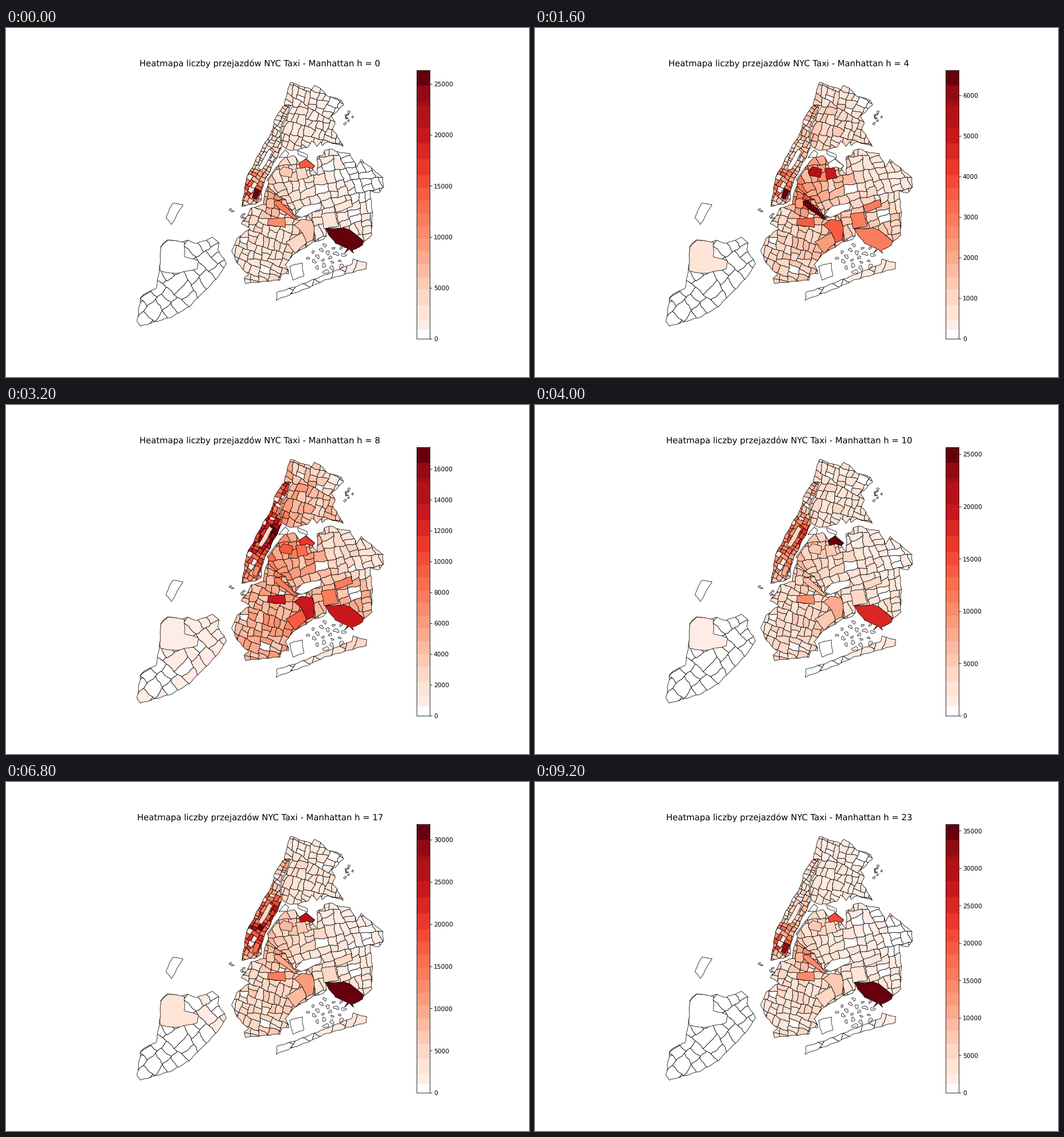
Animation of 917 by 611 pixels, one loop 9.6 s. Source, as a matplotlib script:

```python
import math
import random

import matplotlib.pyplot as plt
import numpy as np
from matplotlib.animation import FuncAnimation
from matplotlib.collections import PolyCollection
from matplotlib.patches import Polygon, Rectangle
from matplotlib.path import Path

W, H, DPI = 917, 611, 64
PT = 72 / DPI          # points per pixel
LINE = 0.75 * PT
plt.rcParams["text.hinting"] = "none"

# Levels are shares of the peak at these hours, linear in between
HOURS = [0, 4, 8, 10, 17, 24]
PEAK_HOURS = [0, 4, 8, 10, 14, 17, 23]
PEAKS = [26370, 6620, 17430, 25690, 28600, 31870, 35900]

QUIET = (.01, .02, .03, .02, .02)
JAMAICA = (.10, .43, .42, .18, .18)

# Land border shared by two boroughs, north-west to south
BORDER = [(459, 277), (475, 292), (489, 301), (509, 333), (529, 327), (537, 337), (541, 374)]

# name: (grid angle, largest zone area, coast key points, anchors with their levels)
BOROUGHS = {
    "manhattan": (29, 105, [
        (413, 312), (418, 287), (421, 264), (433, 241), (447, 214), (468, 178), (470, 162),
        (485, 137), (499, 134), (494, 150), (485, 166), (480, 180), (483, 210), (473, 230),
        (460, 255), (449, 279), (447, 303), (436, 308)], {
        (475, 170): (.13, .25, .52, .23, .22),
        (462, 230): (.13, .18, .95, .60, .66),
        (442, 236): (.09, .16, .72, .44, .46),
        (437, 256): (.33, .42, .60, .42, .68),
        (426, 284): (.52, .44, .40, .33, .50),
        (422, 308): (.15, .14, .32, .22, .26)}),
    "bronx": (20, 270, [
        (498, 95), (536, 108), (540, 100), (551, 106), (563, 118), (589, 127), (592, 134),
        (571, 154), (577, 166), (573, 178), (583, 193), (591, 207), (565, 199), (555, 205),
        (551, 198), (546, 208), (536, 198), (528, 209), (499, 215), (484, 206), (482, 181),
        (487, 167), (503, 136), (488, 135), (491, 121)], {
        (492, 185): (.09, .20, .36, .15, .14),
        (530, 160): (.07, .16, .26, .11, .10),
        (560, 185): (.05, .13, .22, .09, .08),
        (588, 137): QUIET}),
    "queens": (-15, 360, BORDER + [
        (556, 371), (562, 364), (560, 351), (582, 350), (603, 353), (627, 374), (641, 363),
        (642, 320), (638, 285), (655, 289), (661, 279), (661, 262), (622, 230), (616, 244),
        (602, 219), (588, 219), (571, 212), (558, 214), (556, 222), (546, 226), (546, 256),
        (537, 247), (541, 241), (526, 229), (514, 237), (506, 224), (490, 226), (479, 238),
        (460, 266)], {
        (482, 262): (.16, .38, .40, .20, .22),
        (530, 285): (.08, .21, .28, .13, .12),
        (600, 335): (.06, .17, .25, .10, .08),
        (590, 250): (.03, .09, .11, .06, .05),
        (640, 270): (.01, .06, .08, .03, .03)}),
    "brooklyn": (15, 260, BORDER + [
        (522, 386), (506, 394), (490, 414), (497, 430), (483, 431), (481, 441), (420, 447),
        (418, 437), (425, 433), (405, 410), (396, 390), (405, 369), (428, 351), (413, 343),
        (431, 315), (452, 309), (452, 295)], {
        (466, 300): (.33, .48, .36, .22, .28),
        (434, 327): (.10, .12, .25, .12, .14),
        (488, 362): (.13, .22, .34, .17, .18),
        (445, 405): (.09, .15, .27, .13, .14)}),
    "staten": (-40, 850, [
        (271, 383), (284, 370), (305, 375), (318, 372), (335, 377), (362, 367), (374, 376),
        (371, 388), (387, 412), (370, 438), (322, 487), (290, 506), (235, 522), (230, 513),
        (236, 472), (250, 461), (263, 457), (272, 405)], {
        (345, 410): (.01, .025, .055, .028, .032),
        (260, 480): QUIET}),
    "rockaway": (20, 900, [
        (475, 463), (474, 476), (530, 455), (560, 441), (632, 421), (632, 411), (609, 405),
        (607, 413), (540, 440), (510, 452)], {
        (520, 452): QUIET,
        (615, 414): (.05, .08, .15, .07, .08)}),
}

# Zones that stand out: levels, outline
LANDMARKS = [
    (QUIET, [(508, 327), (520, 312), (553, 306), (552, 316), (518, 332)]),
    ((.03, .03, .18, .15, .15), [(442, 246), (449, 249), (468, 216), (461, 212)]),
    ((.98, 1, .40, .30, .50), [(432, 297), (437, 281), (446, 285), (439, 300)]),
    ((.32, .42, .70, .50, .97), [(441, 256), (444, 250), (451, 254), (447, 261)]),
    ((.42, .97, .45, .25, .30), [(470, 303), (479, 302), (509, 331), (507, 336), (470, 309)]),
    ((.40, .56, .75, .38, .42), [(460, 334), (489, 332), (490, 349), (459, 345)]),
    ((.19, .56, .75, .30, .37), [(506, 345), (517, 335), (537, 337), (541, 352), (538, 372),
                                 (527, 376), (520, 358)]),
    ((.14, .36, .55, .22, .24), [(491, 375), (520, 358), (527, 376), (507, 394)]),
    ((.20, .80, .55, .23, .27), [(479, 250), (486, 243), (503, 247), (500, 262), (482, 258)]),
    ((.13, .78, .50, .20, .22), [(508, 247), (524, 243), (530, 262), (512, 266)]),
    (JAMAICA, [(553, 326), (576, 322), (583, 347), (558, 351)]),
    (JAMAICA, [(575, 311), (605, 300), (608, 312), (580, 323)]),
    ((.01, .09, .06, .05, .08), [(271, 384), (284, 371), (313, 375), (313, 400), (338, 408),
                                 (335, 422), (296, 430), (270, 426)]),
    ((.52, .03, .63, 1, .82), [(514, 237), (525, 229), (541, 241), (536, 247), (527, 243),
                               (516, 246)]),
    ((1, .42, .74, .68, 1), [(560, 351), (575, 352), (592, 350), (603, 353), (627, 374),
                             (625, 381), (608, 389), (609, 395), (602, 387), (594, 394),
                             (599, 386), (578, 377), (566, 362)]),
]
ISLANDS = [
    [(293, 307), (310, 309), (303, 322), (290, 344), (281, 333), (286, 317)],
    [(511, 214), (528, 222), (528, 228), (513, 221)],
    [(478, 227), (490, 213), (495, 219), (493, 226)],
    [(458, 266), (474, 243), (475, 245), (460, 267)],
    [(497, 417), (519, 411), (522, 434), (503, 441)],
]

# Bar borders, bottom to top
BANDS = np.interp(range(21), [0, 2, 4, 13, 16, 17, 18, 20],
                  [544, 511, 458, 258, 174, 136, 128, 73.5])
BAR_X, BAR_W = 719.5, 23
LIMITS = (BANDS[0] - BANDS) / (BANDS[0] - BANDS[-1])
REDS = plt.get_cmap("Reds")
COLORS = REDS((LIMITS[:-1] + LIMITS[1:]) / 2)
COLORS[0], COLORS[-1] = 1, REDS(1.0)


def rough(points, size):
    """Refine a polygon and bend it; shared borders bend alike."""
    fine = []
    for a, b in zip(points, points[1:] + points[:1]):
        a, b = np.array(a, float), np.array(b, float)
        n = max(1, round(math.dist(a, b) / 3))
        fine += [a + (b - a) * k / n for k in range(n)]
    x, y = np.array(fine).T
    dx = np.sin(.31 * y + .12 * x) + .6 * np.sin(1.1 * y - .7 * x)
    dy = np.sin(.29 * x - .10 * y) + .6 * np.sin(1.2 * x + .8 * y)
    return np.column_stack([x + size * dx, y + size * dy])


def halve(poly, normal, level):
    """Both parts of a convex polygon cut by a line."""
    parts = [], []
    for a, b in zip(poly, poly[1:] + poly[:1]):
        da, db = a @ normal - level, b @ normal - level
        parts[da > 0].append(a)
        if da * db < 0:
            cut = a + (b - a) * da / (da - db)
            parts[0].append(cut)
            parts[1].append(cut)
    return parts


def area(poly):
    x, y = np.array(poly).T
    return abs(x @ np.roll(y, 1) - y @ np.roll(x, 1)) / 2


def subdivide(poly, angle, limit, rng):
    """Cut across the longer side until every zone is small enough."""
    if area(poly) < limit * rng.uniform(.8, 1.2):
        return [poly]
    axes = [np.array([math.cos(t), math.sin(t)]) for t in (angle, angle + math.pi / 2)]
    spans = [np.ptp([p @ axis for p in poly]) for axis in axes]
    tilt = angle + (spans[1] > spans[0]) * math.pi / 2 + rng.uniform(-.2, .2)
    normal = np.array([math.cos(tilt), math.sin(tilt)])
    reach = [p @ normal for p in poly]
    level = min(reach) + rng.uniform(.4, .6) * np.ptp(reach)
    return [zone for part in halve(poly, normal, level)
            for zone in subdivide(part, angle, limit, rng)]


def frame_box(points, angle):
    """Turned rectangle around the points."""
    c, s = math.cos(angle), math.sin(angle)
    turn = np.array([[c, s], [-s, c]])
    local = np.array(points) @ turn.T
    (u0, v0), (u1, v1) = local.min(0) - 3, local.max(0) + 3
    return [np.array(p) @ turn for p in ((u0, v0), (u1, v0), (u1, v1), (u0, v1))]


def blend(place, anchors):
    """Levels at a place, weighted by nearness to the anchors."""
    near = [1 / (math.dist(place, spot) + 1) ** 3 for spot in anchors]
    return np.average(list(anchors.values()), axis=0, weights=near)


def islet(x, y, r):
    t = np.linspace(0, 2 * np.pi, 14, endpoint=False)
    rad = r * (.8 + .25 * np.sin(2 * t + x) + .2 * np.sin(3 * t + y))
    return np.column_stack([x + rad * np.cos(t), y + .85 * rad * np.sin(t)])


def add_zones(shapes, levels, outline=None):
    zones = PolyCollection(shapes, edgecolors="black", linewidths=LINE)
    ax.add_collection(zones)
    if outline is not None:
        zones.set_clip_path(outline, ax.transData)
    layers.append((zones, np.array(levels)))


def add_outline(points, face="none"):
    ax.add_patch(Polygon(points, fc=face, ec="black", lw=LINE, joinstyle="round"))


def add_borough(turn, limit, coast, anchors, rng):
    angle = math.radians(turn)
    edge = rough(coast, .6)
    outline = Path(np.vstack([edge, edge[:1]]))
    shapes, levels = [], []
    for zone in subdivide(frame_box(coast, angle), angle, limit, rng):
        shape = rough(zone, .8)
        if not outline.intersects_path(Path(shape)):
            continue
        factor = .1 if rng.random() < .05 else rng.uniform(.7, 1.3)
        shapes.append(shape)
        levels.append(blend(np.mean(zone, axis=0), anchors) * factor)
    add_zones(shapes, levels, outline)
    add_outline(edge)


fig = plt.figure(figsize=(W / DPI, H / DPI), dpi=DPI, facecolor="white")
ax = fig.add_axes([0, 0, 1, 1])
ax.set(xlim=(0, W), ylim=(H, 0))
ax.axis("off")
layers = []

rng = random.Random(7)
for borough in BOROUGHS.values():
    add_borough(*borough, rng)
add_zones([rough(shape, .4) for _, shape in LANDMARKS], [levels for levels, _ in LANDMARKS])
for shape in ISLANDS:
    add_outline(rough(shape, .4), "white")

# Marsh islets on a spiral, then specks off the east and west shores
for k in range(20):
    r, t = math.sqrt((k + .5) / 20), 2.4 * k
    add_outline(islet(563 + 36 * r * math.cos(t), 402 + 25 * r * math.sin(t),
                      rng.uniform(2.5, 5.5)), "white")
for x, y, sx, sy, count in [(598, 154, 6, 12, 9), (416, 331, 5, 6, 5), (396, 320, 3, 3, 2)]:
    for _ in range(count):
        add_outline(islet(rng.gauss(x, sx / 1.5), rng.gauss(y, sy / 1.5),
                          rng.uniform(1, 3)), "white")

for low, high, color in zip(BANDS, BANDS[1:], COLORS):
    ax.add_patch(Rectangle((BAR_X, high), BAR_W, low - high, fc=color, lw=0, antialiased=False))
bar = fig.add_axes([BAR_X / W, 1 - BANDS[0] / H, BAR_W / W, (BANDS[0] - BANDS[-1]) / H])
bar.patch.set_visible(False)
bar.set_xticks([])
bar.yaxis.tick_right()
bar.tick_params(labelsize=10.61 * PT, length=3.7 * PT, pad=3.7 * PT, width=.8 * PT)
for spine in bar.spines.values():
    spine.set_linewidth(.8 * PT)

title = ax.text(445.5, 67, "", ha="center", va="baseline", fontsize=14.86 * PT)


def draw(hour):
    title.set_text(f"Heatmapa liczby przejazdów NYC Taxi - Manhattan h = {hour}")
    bar.set_ylim(0, np.interp(hour, PEAK_HOURS, PEAKS))
    for zones, levels in layers:
        now = [np.interp(hour, HOURS, [*row, row[0]]) for row in levels]
        zones.set_facecolor(COLORS[np.digitize(np.clip(now, 0, 1), LIMITS[1:-1])])
    return []


anim = FuncAnimation(fig, draw, frames=24, interval=400, repeat=True, repeat_delay=0)
plt.show()
```
